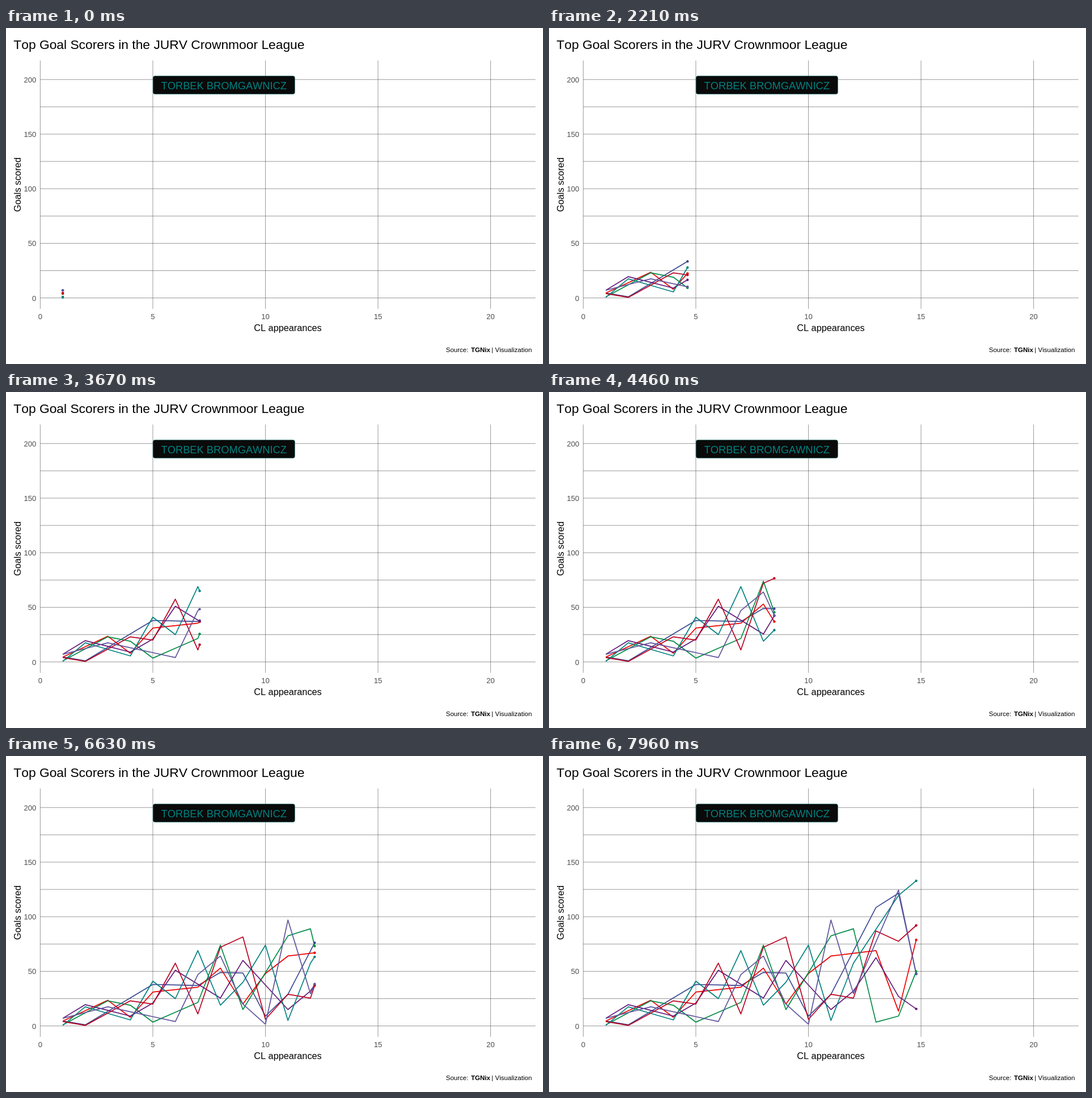
An HTML page for the animation above (8 s loop, 947x592 px).

```html
<!DOCTYPE html>
<html lang="en">
<head>
<meta charset="utf-8">
<title>Top goal scorers</title>
<style>
  html, body { margin: 0; width: 100%; height: 100%; overflow: hidden; background: #fff; }
  svg { display: block; font-family: "Liberation Sans", Arial, sans-serif; font-kerning: none; }
  .grid { stroke: #333; stroke-width: 0.5; }
  .tick { font-size: 13.1px; fill: #4d4d4d; }
  .axis { font-size: 16.3px; text-anchor: middle; }
  .caption { font-size: 11.55px; }
  #lines path { fill: none; stroke-width: 1.7; stroke-linejoin: round; }
</style>
</head>
<body>
<svg width="947" height="592" viewBox="0 0 947 592">
  <g id="grid"></g>
  <g id="lines"></g>
  <g id="dots"></g>
  <rect x="259.2" y="84.4" width="250.2" height="32" rx="3.5" fill="#0a0a0a" stroke="#008280" stroke-width="0.5"/>
  <text x="384.3" y="107.6" font-size="18.3" fill="#008280" text-anchor="middle">TORBEK BROMGAWNICZ</text>
  <text x="13.3" y="37.3" font-size="22.8">Top Goal Scorers in the JURV Crownmoor League</text>
  <text class="axis" x="497" y="534">CL appearances</text>
  <text class="axis" transform="translate(25.8 276) rotate(-90)">Goals scored</text>
  <g class="caption">
    <text x="775.7" y="571">Source:</text>
    <text x="820" y="571" font-weight="bold">TGNix</text>
    <text x="856.3" y="571">| Visualization</text>
  </g>
</svg>
<script>
const LOOP = 8000, FPS = 24, FRAMES_PER_UNIT = 13.75;
const xAt = appearance => 60.4 + 39.71 * appearance;
const yAt = goals => 475.6 - 1.924 * goals;

// Goals at the turning points; blanks lie on the straight line between neighbours.
const turningPoints = {
  "#3B4992": [4.5, 1, , , 38, , 37, 49, 48.5, 9, 29, , 108.5, 121.5, 28],
  "#EE0000": [4.5, , 23.5, 8, 31, , 35.5, 53, 20, 48, 64, , 69, 13.5, 96.5],
  "#008B45": [1, , 23, 19, 3.5, , 21.5, 74, 15, , 82.5, 89, 3.5, 9, 61],
  "#631879": [7, 19.5, , 9, 21, 51, , 25.5, 60, , 15, 32, 62.5, 27, 12.5],
  "#008280": [0.5, 17.5, , 5.5, 41, 25, 69, 19, 40, 74, 5, 57.5, , 119.5, 136.5],
  "#BB0021": [4, 0.5, , 23, 20, 57.5, 11, 72, 81.5, 6, 29, 25.5, 87, 77.5, 96],
  "#5F559B": [7, , 17.5, , , 4, 47, 64, 20, 1.5, 97, 29.5, , 124.5, 26.5]
};

const lerp = (a, b, p) => a + (b - a) * p;

function fillBlanks(values) {
  return Array.from(values, (value, i) => {
    if (i in values) return value;
    let before = i, after = i;
    while (!(before in values)) before--;
    while (!(after in values)) after++;
    return lerp(values[before], values[after], (i - before) / (after - before));
  });
}

function add(parent, tag, attrs, text = "") {
  const node = document.createElementNS("http://www.w3.org/2000/svg", tag);
  for (const key in attrs) node.setAttribute(key, attrs[key]);
  node.textContent = text;
  return document.getElementById(parent).appendChild(node);
}

for (let goals = 0; goals <= 200; goals += 25) {
  const y = yAt(goals);
  add("grid", "path", { class: "grid", d: `M60.4 ${y}H933.8` });
  if (goals % 50 === 0)
    add("grid", "text", { class: "tick", x: 53.3, y: y + 5, "text-anchor": "end" }, goals);
}
for (let appearance = 0; appearance <= 20; appearance += 5) {
  const x = xAt(appearance);
  add("grid", "path", { class: "grid", d: `M${x} 57.3V494.8` });
  add("grid", "text", { class: "tick", x, y: 513, "text-anchor": "middle" }, appearance);
}

const players = Object.entries(turningPoints).map(([color, values]) => ({
  ys: fillBlanks(values).map(yAt),
  line: add("lines", "path", { stroke: color }),
  dot: add("dots", "circle", { r: 2.2, fill: color })
}));

// Each appearance starts on a whole frame; halves round to even.
function keyFrame(i) {
  const frame = i * FRAMES_PER_UNIT;
  return frame % 1 === 0.5 ? 2 * Math.round(frame / 2) : Math.round(frame);
}

function draw(time) {
  const frame = Math.floor((time + 5) * FPS / 1000);
  let i = 0;
  while (i < 13 && keyFrame(i + 1) <= frame) i++;
  const progress = (frame - keyFrame(i)) / (keyFrame(i + 1) - keyFrame(i));
  const eased = Math.min(progress, 1) ** 3;
  const x = xAt(i + 1 + eased);

  for (const { ys, line, dot } of players) {
    const y = lerp(ys[i], ys[i + 1], eased);
    const points = ys.slice(0, i + 1).map((py, k) => `${xAt(k + 1)} ${py}`);
    line.setAttribute("d", `M${[...points, `${x} ${y}`].join("L")}`);
    dot.setAttribute("cx", x);
    dot.setAttribute("cy", y);
  }
}

function tick() {
  draw(performance.now() % LOOP);
  requestAnimationFrame(tick);
}
tick();
</script>
</body>
</html>
```
